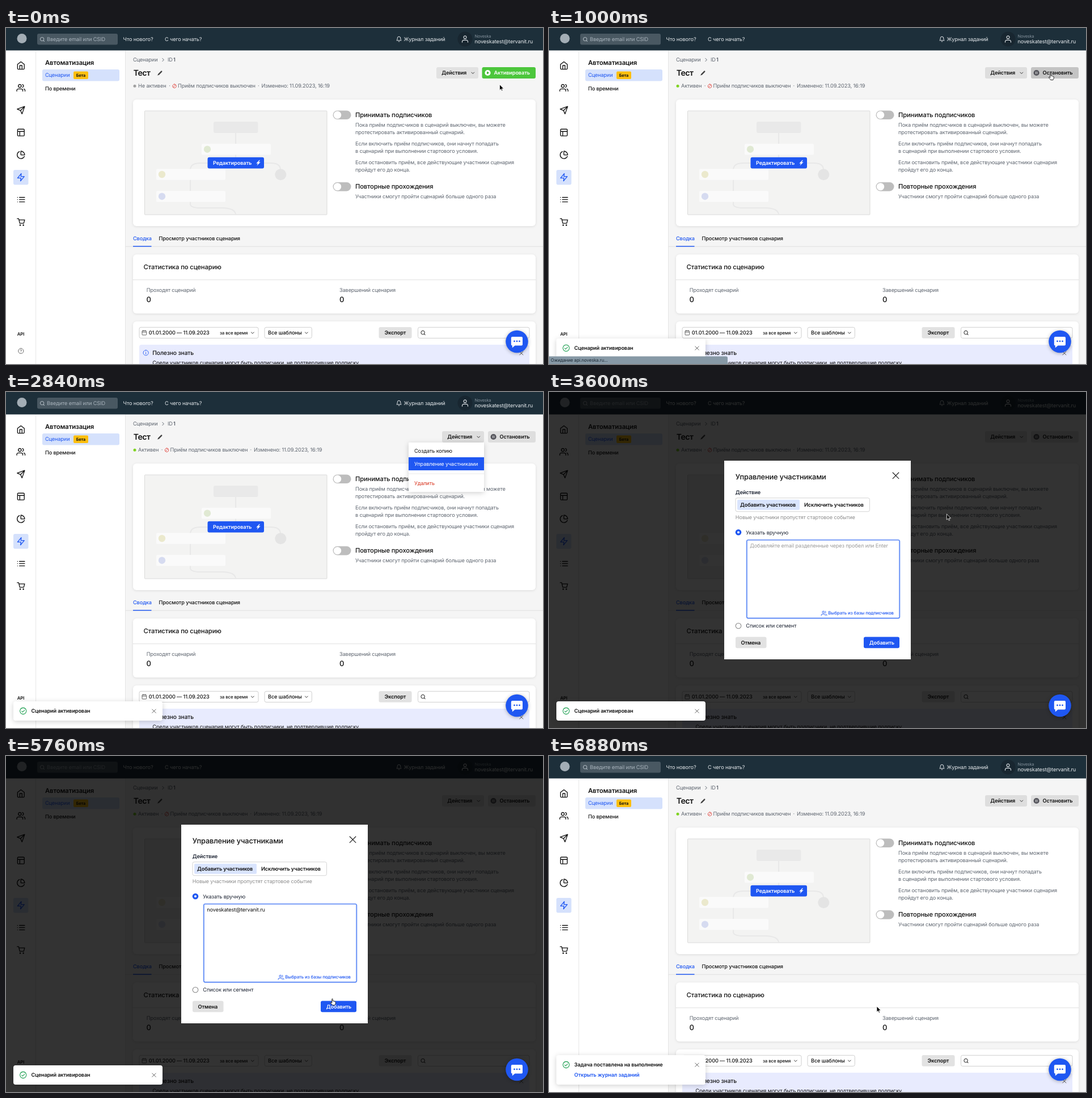
These frames come from a looping animation (947 px wide and 592 px high, 7.6 s). An HTML page:

```html
<!DOCTYPE html>
<html lang="ru">
<head>
<meta charset="utf-8">
<title>Сценарий</title>
<style>
html, body { margin: 0; width: 100%; height: 100%; overflow: hidden; background: #f5f5f5; }
svg { display: block; width: 100vw; height: 100vh; font-family: Inter, "Noto Sans", sans-serif; letter-spacing: -.008em; }
text { white-space: pre; text-rendering: geometricPrecision; }
.card { fill: #fff; filter: drop-shadow(0 1px 2px rgba(0,0,0,.1)); }
.float { fill: #fff; filter: drop-shadow(0 2px 5px rgba(0,0,0,.18)); }
</style>
</head>
<body>
<svg id="stage" viewBox="0 0 947 592" preserveAspectRatio="none"></svg>
<script>
const LOOP = 7600;
const BLUE = '#1f57f2', GREY = '#5f6670', INK = '#111';
const EMAIL = 'noveskatest@tervanit.ru';

const text = (x, y, s, fill = INK, weight = 400, size = 9.2, more = '') =>
  `<text x="${x}" y="${y}" fill="${fill}" font-weight="${weight}" font-size="${size}" ${more}>${s}</text>`;
const rect = (x, y, w, h, fill, r = 0, more = '') =>
  `<rect x="${x}" y="${y}" width="${w}" height="${h}" rx="${r}" fill="${fill}" ${more}/>`;
const circle = (x, y, r, fill, more = '') => `<circle cx="${x}" cy="${y}" r="${r}" fill="${fill}" ${more}/>`;
const line = (d, stroke, width = 1, more = '') =>
  `<path d="${d}" fill="none" stroke="${stroke}" stroke-width="${width}" stroke-linecap="round" stroke-linejoin="round" ${more}/>`;
const group = (id, s, more = '') => `<g id="${id}" ${more}>${s}</g>`;
const border = (x, y, w, h, c = '#cfcfcf') => rect(x, y, w, h, '#fff', 3, `stroke="${c}"`);
const cross = (x, y, r, c, w = 1) => line(`M${x - r} ${y - r}l${2 * r} ${2 * r}m0 ${-2 * r}l${-2 * r} ${2 * r}`, c, w);
const chevron = (x, y, c = '#333') => line(`M${x - 2.4} ${y - 1.2}l2.4 2.4 2.4-2.4`, c, 1);

// Icons on a 24 unit grid, centred on x, y
const ICON = {
  home: 'M3 9l9-7 9 7v11a2 2 0 0 1-2 2H5a2 2 0 0 1-2-2zM9 22V12h6v10',
  users: 'M17 21v-2a4 4 0 0 0-4-4H5a4 4 0 0 0-4 4v2M9 3a4 4 0 1 0 0 8 4 4 0 0 0 0-8M23 21v-2a4 4 0 0 0-3-3.87M16 3.13a4 4 0 0 1 0 7.75',
  send: 'M22 2L11 13M22 2l-7 20-4-9-9-4z',
  layout: 'M5 3h14a2 2 0 0 1 2 2v14a2 2 0 0 1-2 2H5a2 2 0 0 1-2-2V5a2 2 0 0 1 2-2zM3 9h18M9 21V9',
  pie: 'M21.2 15.9A10 10 0 1 1 8 2.8M22 12A10 10 0 0 0 12 2v10z',
  bolt: 'M13 2L3 14h9l-1 8 10-12h-9l1-8z',
  flash: 'M16 1L4 14h7l-4 9 14-14h-8l6-8z',
  list: 'M8 6h14M8 12h14M8 18h14M3 6h.01M3 12h.01M3 18h.01',
  cart: 'M2 3h4l3 12.500h10.500L22 6.500H7M10 19.500a1 1 0 1 0 .1 0zM18.500 19.500a1 1 0 1 0 .1 0z',
  help: 'M12 2a10 10 0 1 0 .1 0zM9.1 9a3 3 0 0 1 5.8 1c0 2-3 3-3 3M12 17h.01',
  bell: 'M18 8A6 6 0 0 0 6 8c0 7-3 9-3 9h18s-3-2-3-9M13.7 21a2 2 0 0 1-3.4 0',
  user: 'M20 21v-2a4 4 0 0 0-4-4H8a4 4 0 0 0-4 4v2M12 3a4 4 0 1 0 .1 0z',
  search: 'M11 3a8 8 0 1 0 .1 0zM21 21l-4.300-4.300',
  check: 'M12 2a10 10 0 1 0 .1 0zM7.500 12.500l3 3 6-6',
  info: 'M12 2a10 10 0 1 0 .1 0zM12 11v6M12 7h.01',
  calendar: 'M5 4h14a2 2 0 0 1 2 2v14a2 2 0 0 1-2 2H5a2 2 0 0 1-2-2V6a2 2 0 0 1 2-2zM3 10h18M8 2v4M16 2v4'
};
const icon = (name, x, y, size, color, width = 1.3, fill = 'none') =>
  `<path transform="translate(${x - size / 2} ${y - size / 2}) scale(${size / 24})" d="${ICON[name]}" fill="${fill}"
   stroke="${color}" stroke-width="${width * 24 / size}" stroke-linecap="round" stroke-linejoin="round"/>`;

const header = () =>
  rect(0, 0, 947, 39.5, '#1d2f3a') +
  circle(28, 18.5, 8.5, '#a3adb5') +
  rect(55, 10, 142, 19.5, '#495862', 3) +
  icon('search', 64, 20, 9.5, '#b4bec6', 1) +
  text(72, 23.3, 'Введите email или CSID', '#a9b4bd') +
  text(206.5, 23.3, 'Что нового?', '#e4e8eb') +
  text(280, 23.3, 'С чего начать?', '#e4e8eb') +
  icon('bell', 693, 19.7, 11, '#e4e8eb', 1) +
  text(701.5, 23.3, 'Журнал заданий', '#e4e8eb') +
  circle(809.5, 19.5, 13, '#182630') +
  icon('user', 809.5, 19.5, 15, '#dfe4e8', 1.1) +
  text(826.5, 16.7, 'Noveska', '#87949f', 400, 7.25) +
  text(826.5, 27.2, EMAIL, '#e9edf0');

const sidebar = () => {
  const names = ['home', 'users', 'send', 'layout', 'pie', 'bolt', 'list', 'cart'];
  return rect(0, 39.5, 210.5, 553, '#fff') +
    line('M52.600 40V592M210.500 40V592', '#e0e0e0', .8) +
    rect(13, 250, 26.5, 26.3, '#d5e1fc', 3) +
    names.map((n, i) => icon(n, 26.3, 66 + i * 39.4, 15.8, n == 'bolt' ? BLUE : INK, 1.35)).join('') +
    text(26, 541.9, 'API', INK, 600, 7.9, 'text-anchor="middle"') +
    icon('help', 26.3, 569, 11, '#555', .9) +
    text(69, 65.3, 'Автоматизация', INK, 600, 11.3) +
    rect(64, 73, 136, 20.5, '#d5e1fc', 3) +
    text(69, 86.300, 'Сценарии', BLUE) +
    rect(119, 76.5, 26, 13.5, '#fdbf0f', 2) +
    text(132, 86, 'Бета', INK, 700, 7.3, 'text-anchor="middle"') +
    text(69, 109.8, 'По времени', INK, 500);
};

const statusLine = (dot, label, dx) =>
  circle(227, 102.3, 2.5, dot) + text(233, 105.4, label, GREY) +
  `<g transform="translate(${dx} 0)">` +
  text(287.2, 105.4, '·', GREY) +
  line('M297 99a3.300 3.300 0 1 0 .1 0zM294.800 104.500l4.400-4.400', '#e0413a', .9) +
  text(303, 105.4, 'Приём подписчиков выключен', GREY) +
  text(444, 105.4, '·', GREY) +
  text(450.5, 105.4, 'Изменено: 11.09.2023, 16:19', GREY) + '</g>';

const actions = (x, id) =>
  rect(x, 69, 74, 20, '#e2e2e2', 3, `id="${id}"`) +
  text(x + 9.2, 82.4, 'Действия', INK, 600) + chevron(x + 64.3, 79.3);

const pageTop = () =>
  text(224, 59.4, 'Сценарии', GREY) + line('M275.800 53.500l2.600 2.600-2.600 2.600', GREY) +
  text(285, 59.4, 'ID', GREY) + text(295, 59.4, '1', '#444b55', 500) +
  text(224.8, 84.3, 'Тест', INK, 600, 14, 'style="letter-spacing:-.035em"') +
  line('M269 81.800l5.200-5.200', '#444', 2.5, 'stroke-linecap="butt"') + line('M267.500 83.200l.8-.8', '#444', 1) +
  group('off', statusLine('#a0a0a0', 'Не активен', 0) + actions(759, 'act0') +
    rect(839.500, 69, 94.500, 20, '#4cc63c', 3, 'id="go"') +
    circle(849.5, 79, 5.1, '#fff') + '<path d="M848 76.400v5.200l4.300-2.600z" fill="#3fae32"/>' +
    text(860.5, 82.4, 'Активировать', '#fff', 600)) +
  group('on', statusLine('#7fd321', 'Активен', -13.5) + actions(769, 'act1') +
    rect(850, 69, 84, 20, '#dedede', 3, 'id="stop"') +
    circle(859.6, 79, 5.1, '#55555c') + line('M858.400 77.200v3.600M860.800 77.200v3.600', '#ddd', 1) +
    text(870.5, 82.4, 'Остановить', INK, 600));

const step = (x, y, c) => rect(x, y, 122, 19.5, '#fafafa', 2) + circle(x + 10, y + 9.7, 6.2, c);
const toggle = y => rect(576.5, y - 7.8, 32, 15.6, '#bdbdbd', 7.8) + circle(584.5, y, 6.7, '#fff');

const settings = () => {
  const notes = [
    [173.8, 'Пока приём подписчиков в сценарий выключен, вы можете'],
    [186.9, 'протестировать активированный сценарий.'],
    [206.7, 'Если включить приём подписчиков, они начнут попадать'],
    [219.8, 'в сценарий при выполнении стартового условия.'],
    [239.7, 'Если остановить приём, все действующие участники сценария'],
    [252.8, 'пройдут его до конца.'],
    [300, 'Участники смогут пройти сценарий больше одного раза']
  ];
  return rect(224, 126, 710, 223, '#fff', 6, 'class="card"') +
    rect(244.5, 146, 321.5, 183, '#f3f3f2', 1, 'stroke="#d2d2d2" stroke-width=".8"') +
    line('M405 185v20M405 223v15M405 238h-62q-18 0-18 12v60q0 7 18 7h38q22 0 24 11M405 238h62q17 0 17 12', '#e8e8e8', 2) +
    rect(366, 165, 78.5, 20, '#e9e9e9', 3) +
    step(345, 204, '#e0e9d3') + step(265, 248.3, '#ebe9cd') + step(265, 287, '#d6dbf0') +
    circle(484.3, 258.3, 10, '#e4e4e4') +
    rect(355.5, 227.7, 99.5, 19.8, BLUE, 3) + text(365, 241, 'Редактировать', '#fff', 600) +
    icon('flash', 444.8, 237.6, 9.5, '#fff', .3, '#fff') +
    toggle(153.3) + toggle(279.6) +
    text(616, 156.5, 'Принимать подписчиков', INK, 500, 11.2) +
    text(616, 282.7, 'Повторные прохождения', INK, 500, 11.2) +
    notes.map(([y, s]) => text(616, y, s, GREY)).join('');
};

const lower = () =>
  line('M211 385H947', '#dcdcdc', .9) +
  text(224, 373.8, 'Сводка', BLUE, 500) + rect(224, 383.9, 32.5, 1.5, BLUE) +
  text(269.5, 373.8, 'Просмотр участников сценария', INK, 500) +
  rect(224, 399, 710, 104, '#fff', 6, 'class="card"') + line('M224 443.700H934', '#dcdcdc', .9) +
  text(242.5, 425.4, 'Статистика по сценарию', INK, 500, 11.3) +
  text(247.8, 465.3, 'Проходят сценарий', GREY) + text(588, 465.3, 'Завершений сценария', GREY) +
  text(247.6, 483.4, '0', INK, 500, 13.1) + text(588, 483.4, '0', INK, 500, 13.1) +
  rect(224, 517, 710, 90, '#fff', 6, 'class="card"') +
  border(235, 527.300, 210, 19.2) + icon('calendar', 243.8, 536.8, 10, '#555', .9) +
  text(251.8, 540.2, '01.01.2000 — 11.09.2023', INK, 500, 9.2) +
  text(377, 539.8, 'за все время', INK, 500, 7.9) + chevron(434.800, 537.200) +
  border(456, 527.300, 83.300, 19.2) + text(462, 540.2, 'Все шаблоны', INK, 500) + chevron(529.800, 537.200) +
  rect(657.500, 527, 58, 19.7, '#e2e2e2', 3) + text(667.600, 540.2, 'Экспорт', INK, 600) +
  border(726.500, 527.300, 196.5, 19.2) + icon('search', 735.500, 537, 9.5, '#444', 1.2) +
  rect(235, 558, 688, 40, '#e8ebfe', 4) + icon('info', 246.600, 572.2, 11, BLUE, .9) +
  text(258.300, 576, 'Полезно знать', INK, 500, 10.3) +
  cross(908.800, 573, 3, '#555') +
  text(258.300, 593.3, 'Среди участников сценария могут быть подписчики, не подтвердившие подписку.');

const menu = () =>
  rect(710, 89, 133, 87, '#fff', 1, 'class="float"') +
  text(720, 106.9, 'Создать копию') +
  rect(710, 115, 133, 23, BLUE, 0, 'id="menuHover"') +
  text(720, 129.9, 'Управление участниками', INK, 400, 9.2, 'id="menuText"') +
  line('M710 144H843', '#e2e2e2', .8) + text(720, 164.2, 'Удалить', '#d8341e');

const modal = () =>
  rect(309, 121, 329, 350, '#fff') +
  text(328.800, 153.5, 'Управление участниками', INK, 500, 12.8) + cross(611.500, 147.3, 5.3, '#222', 1.2) +
  text(328.800, 179.6, 'Действие', '#1d2433', 600) +
  border(329, 186.700, 236.5, 24, '#d4d4d4') + rect(332, 189.700, 110, 18, '#d9e4fd', 2) +
  text(337, 202.1, 'Добавить участников', INK, 600) + text(450, 202.1, 'Исключить участников', INK, 600) +
  text(328.800, 224.4, 'Новые участники пропустят стартовое событие', '#8d8d8d') +
  circle(334, 247.3, 5.3, BLUE) + circle(334, 247.3, 2, '#fff') +
  text(347.300, 250.6, 'Указать вручную', '#1d2433') +
  rect(349, 261, 269, 137.300, '#fff', 2.5, 'stroke="#c3d4fb" stroke-width="3.4"') +
  rect(349, 261, 269, 137.300, '#fff', 2, 'stroke="#3a70f4" stroke-width="1.2"') +
  text(354.300, 273.7, 'Добавляйте email разделенные через пробел или Enter', '#9a9a9a', 400, 9.2, 'id="hint"') +
  text(354.300, 273.7, EMAIL, INK, 400, 9.2, 'id="typed"') +
  rect(354, 265, .9, 11, '#111', 0, 'id="caret"') +
  icon('users', 485, 390, 10.5, BLUE, .9) +
  text(492.300, 392, 'Выбрать из базы подписчиков', BLUE, 500, 7.9) +
  circle(334, 412, 4.8, '#fff', 'stroke="#888" stroke-width="1.1"') +
  text(347.300, 415.2, 'Список или сегмент', '#1d2433') +
  rect(329, 431.500, 54.500, 19.8, '#e2e2e2', 3) + text(338.500, 444.7, 'Отмена', INK, 600) +
  rect(555, 431.500, 63, 19.8, BLUE, 3, 'id="add"') + text(564.800, 444.7, 'Добавить', '#fff', 600) +
  group('picker',
    rect(480, 396, 229, 103, '#fff', 2, 'class="float"') +
    border(486, 402, 217, 18) + icon('search', 495, 411, 9, '#555', 1) +
    rect(480, 425, 229, 23.5, '#eef2fe', 0, 'id="row"') + text(488, 440, EMAIL));

const toast = (id, y, h, title, extra = '') => group(id,
  rect(13, y, 263, h, '#fff', 4, 'class="float"') +
  icon('check', 30.200, y + 17, 13.5, '#1fa052', 1.1) +
  text(44.600, y + 20.3, title, INK, 600, 9.15) +
  cross(261, y + 17.2, 3.2, '#666', 1) + extra);

const chat = () =>
  circle(901, 552.5, 19.8, BLUE, 'style="filter:drop-shadow(0 1px 3px rgba(0,0,0,.3))"') +
  '<path d="M893 544h16q2 0 2 2v11.500q0 2-2 2h-11.500l-4.700 4v-4q-2 0-2-2V546q0-2 2.200-2z" fill="#fff"/>' +
  [896.5, 901, 905.5].map(x => circle(x, 551.900, 1.400, BLUE)).join('');

const loadBar = () =>
  '<path d="M0 578.500H312q3 0 3 3V592H0z" fill="#8799a6"/>' +
  text(3, 588, 'Ожидание api.noveska.ru...', '#1d2a35', 400, 7.9);

const pointer = () =>
  '<path id="arrow" d="M0 0V10.200L2.400 8.100 3.900 11.500 5.500 10.800 4 7.500H7.200Z" fill="#000" stroke="#fff" stroke-width=".8"/>' +
  '<path id="hand" transform="translate(-3.800 0)" d="M3 .8C3 0 4.600 0 4.600 .8V4.400C5 3.800 6.200 4 6.300 4.700 6.800 4.300 7.900 4.600 8 5.300 8.600 5 9.500 5.400 9.500 6.200V8.400C9.500 10 8.400 10.400 8.300 11.500H3.900C3.700 10.500 2 9.400 .6 7.500 .2 6.700 1.200 6 2 6.700L3 7.700Z" fill="#fff" stroke="#111" stroke-width=".9"/>';

document.getElementById('stage').innerHTML =
  rect(0, 0, 947, 592, '#f5f5f5') + sidebar() + header() + pageTop() + settings() + lower() +
  group('menu', menu()) +
  group('dialog', rect(0, 0, 947, 592, 'rgba(0,0,0,.8)') + modal()) +
  toast('toastA', 545, 34, 'Сценарий активирован') +
  toast('toastB', 527, 52, 'Задача поставлена на выполнение',
    text(44.600, 565.2, 'Открыть журнал заданий', BLUE, 600)) +
  group('load', loadBar()) + chat() + group('cursor', pointer());

const part = {};
document.querySelectorAll('[id]').forEach(e => part[e.id] = e);

const ramp = (t, a, b) => Math.min(1, Math.max(0, (t - a) / (b - a)));
const smooth = p => p * p * (3 - 2 * p);
const out = p => 1 - (1 - p) ** 3;
const within = (t, a, b) => t >= a && t < b;
const fade = (id, o) => {
  part[id].setAttribute('opacity', o);
  part[id].setAttribute('display', o > 0 ? 'inline' : 'none');
};
const tint = (id, c) => part[id].setAttribute('fill', c);
const shift = (id, x, y) => part[id].setAttribute('transform', `translate(${x} ${y})`);

// time, x, y, easing towards this point
const path = [
  [0, 870.5, 99.5], [320, 884.5, 80, smooth], [1880, 884.5, 80], [2080, 786, 76, smooth],
  [2480, 786, 76], [2720, 809, 121, smooth], [3480, 809, 121], [3600, 702, 214, p => p],
  [4240, 546, 389, out], [4680, 546, 389], [4840, 575.5, 427.5, smooth],
  [5760, 575.5, 427.5], [5960, 578, 441, smooth], [LOOP, 578, 441]
];
function cursorAt(t) {
  const i = Math.max(1, path.findIndex(k => k[0] > t));
  const [a, b] = [path[i - 1], path[i]];
  const p = (b[3] || smooth)(ramp(t, a[0], b[0]));
  return [a[1] + (b[1] - a[1]) * p, a[2] + (b[2] - a[2]) * p];
}

function draw(t) {
  const [x, y] = cursorAt(t);
  const hand = within(t, 180, 2900) || within(t, 4080, 6180);
  shift('cursor', x, y);
  fade('cursor', within(t, 2800, 2920) ? 0 : 1);
  fade('hand', +hand);
  fade('arrow', +!hand);

  const active = t >= 720;
  fade('off', +!active);
  fade('on', +active);
  tint('go', t >= 480 ? '#37a02b' : y < 89 ? '#41b233' : '#4cc63c');
  tint('stop', t < 2000 && x > 850 ? '#c4c4c4' : '#dedede');
  tint('act1', within(t, 1960, 2600) && y < 89 && x < 843 ? '#cfcfcf' : '#dedede');
  fade('load', t < 600 ? 0 : 1 - ramp(t, 1240, 1320));

  const hover = y > 112;
  fade('menu', +within(t, 2240, 2920));
  fade('menuHover', +hover);
  tint('menuText', hover ? '#fff' : INK);

  fade('dialog', ramp(t, 2880, 2960) * (1 - ramp(t, 6180, 6330)));
  fade('caret', +(within(t, 2780, 3280) || within(t, 3780, 4240)));
  fade('hint', +(t < 5040));
  fade('typed', +(t >= 5040));
  fade('picker', ramp(t, 4260, 4280) * (1 - ramp(t, 5000, 5080)));
  fade('row', +(t >= 4760));
  tint('add', t > 5800 && y > 431 ? '#1747cf' : BLUE);

  const first = out(ramp(t, 740, 1140)), second = out(ramp(t, 6348, 6788));
  shift('toastA', 0, 45 * (1 - first) - 62 * second);
  fade('toastA', Math.min(1, first * 1.5) * (1 - ramp(t, 6700, 6870)));
  shift('toastB', 0, 62 * (1 - second));
  fade('toastB', Math.min(1, second * 4));
}

const start = performance.now();
function tick() {
  draw((performance.now() - start) % LOOP);
  requestAnimationFrame(tick);
}
tick();
</script>
</body>
</html>
```
